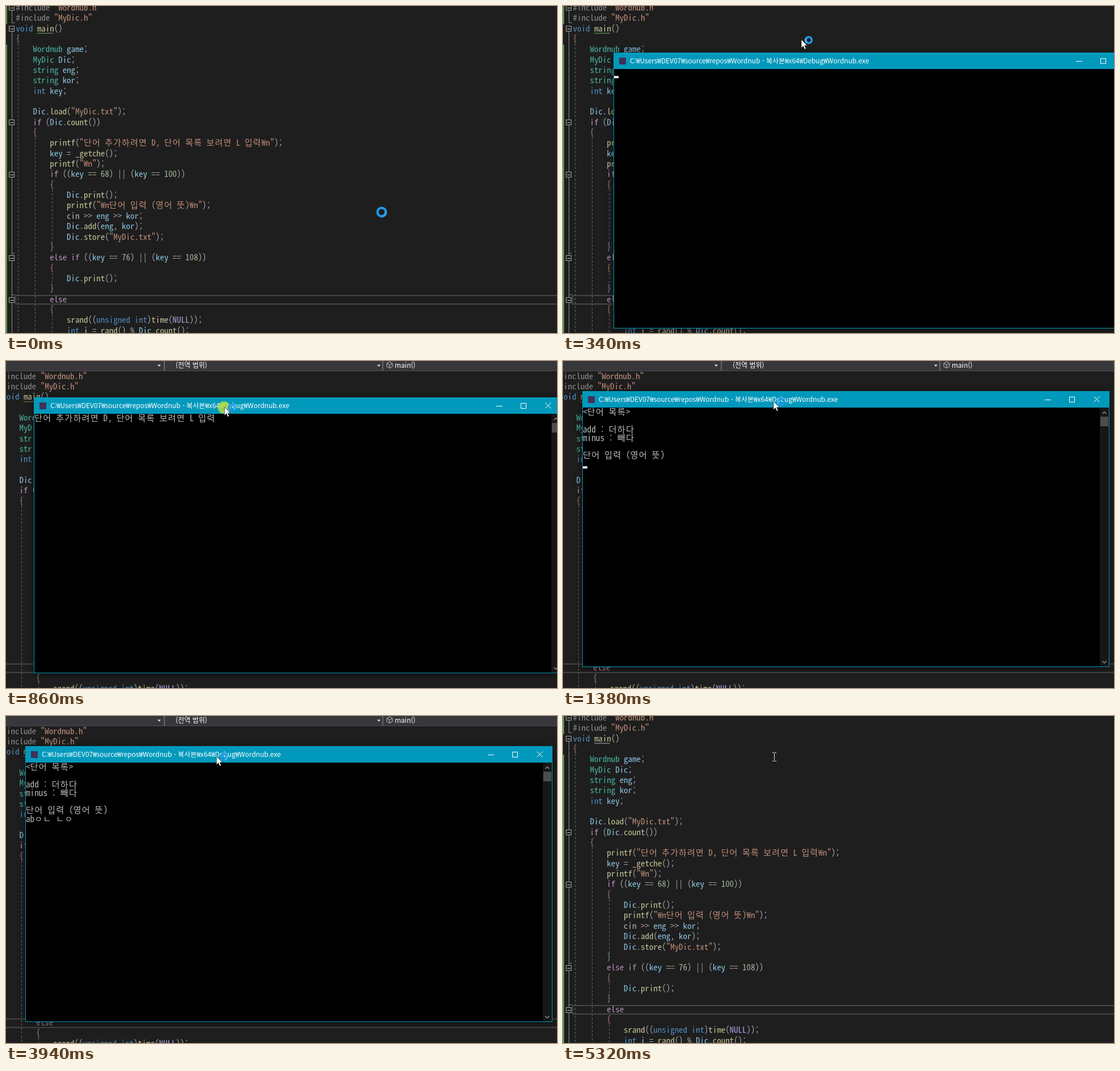
Animation of 971 by 576 pixels, one loop 5520 ms. Source, as an HTML page:

```html
<!DOCTYPE html>
<html lang="ko">
<head>
<meta charset="utf-8">
<style>
  html, body { margin: 0; width: 100%; height: 100%; overflow: hidden; background: #1e1e1e; }
  svg { display: block; }
  .mono { font-family: "Noto Sans Mono CJK KR", "Noto Sans CJK KR", "Noto Sans CJK", "Noto Sans Mono", monospace; font-weight: 300; fill-opacity: .88; }
  .ui { font-family: "Noto Sans CJK KR", "Noto Sans CJK", "Open Sans", sans-serif; }
  #win { filter: drop-shadow(0 3px 7px rgba(0, 0, 0, .5)); }
</style>
</head>
<body>
<svg id="stage" width="971" height="576" viewBox="0 0 971 576"></svg>
<script>
const LOOP = 5520;
const stage = document.getElementById('stage');

function el(tag, attrs, parent = stage) {
  const node = document.createElementNS('http://www.w3.org/2000/svg', tag);
  for (const k in attrs) node.setAttribute(k, attrs[k]);
  return parent.appendChild(node);
}
const rect = (x, y, width, height, fill, parent) => el('rect', { x, y, width, height, fill }, parent);
const line = (d, stroke, parent, more) => el('path', { d, stroke, fill: 'none', ...more }, parent);
const show = (node, on) => node.setAttribute('visibility', on ? 'visible' : 'hidden');
const move = (node, x, y) => node.setAttribute('transform', `translate(${x} ${y})`);

// Hangul takes two cells, everything else one.
const cols = s => [...s].reduce((n, c) => n + (/[\u3131-\ud79d]/.test(c) ? 2 : 1), 0);

function gridText(str, x, y, cell, fill, parent) {
  const xs = [];
  let col = 0;
  for (const c of str) {
    if (c !== ' ') xs.push((x + col * cell).toFixed(2));
    col += cols(c);
  }
  const t = el('text', { x: xs.join(' '), y, fill, class: 'mono', 'font-size': cell * 2 }, parent);
  t.textContent = str.replace(/ /g, '');
}

function label(str, x, y, size, parent) {
  const t = el('text', { x, y, fill: '#fff', class: 'ui', 'font-size': size }, parent);
  t.textContent = str;
  return t;
}

// ---- editor ----
const source = `#include "Wordnub.h"
#include "MyDic.h"
void main()
{
    Wordnub game;
    MyDic Dic;
    string eng;
    string kor;
    int key;

    Dic.load("MyDic.txt");
    if (Dic.count())
    {
        printf("단어 추가하려면 D, 단어 목록 보려면 L 입력₩n");
        key = _getche();
        printf("₩n");
        if ((key == 68) || (key == 100))
        {
            Dic.print();
            printf("₩n단어 입력 (영어 뜻)₩n");
            cin >> eng >> kor;
            Dic.add(eng, kor);
            Dic.store("MyDic.txt");
        }
        else if ((key == 76) || (key == 108))
        {
            Dic.print();
        }
        else
        {
            srand((unsigned int)time(NULL));
            int i = rand() % Dic.count();`.split('\n');

function tokenColor(tok, next) {
  if (tok[0] === '"') return '#d69d85';
  if (tok[0] === '#') return '#9b9b9b';
  if (/^(void|int|unsigned)$/.test(tok)) return '#569cd6';
  if (/^(if|else)$/.test(tok)) return '#cda2d0';
  if (/^(Wordnub|MyDic|string)$/.test(tok)) return '#4ec9b0';
  if (tok === 'NULL') return '#beb7ff';
  if (tok === 'cin') return '#c8c8c8';
  if (/^\d/.test(tok)) return '#b5cea8';
  if (/^\w/.test(tok)) return next === '(' ? '#dcdcaa' : '#9cdcfe';
  if (tok === '{') return '#bf8d78';
  if (tok === '}') return '#7fb0a4';
  return '#b4b4b4';
}

const ide = el('g', {});
const CELL = 7.46, LEFT = 17.6, ROW = 18.35;

el('rect', { x: 17, y: 510, width: 1000, height: 15, fill: 'none', stroke: '#464646', 'stroke-width': 2 }, ide);
rect(0, -30, 2, 62, '#4f9a48', ide);
rect(0, 68, 2, 520, '#4f9a48', ide);
line('M10.5 0V29.5H15.5M10.5 40V576M10.5 435.5H15.5M10.5 508.5H15.5', '#8c8c8c', ide);
for (const y of [3, 40, 205, 297, 444, 518]) {
  el('rect', { x: 5.5, y: y - 4.5, width: 9, height: 9, fill: '#1e1e1e', stroke: '#a5a5a5' }, ide);
  line(`M7.5 ${y + .5}H13`, '#d0d0d0', ide);
}
line('M21.5 66V576M51.5 231V576M81.5 323V418M81.5 470V491M81.5 543V576', '#656565', ide,
  { 'stroke-dasharray': '4 3' });

source.forEach((text, row) => {
  for (const m of text.matchAll(/"[^"]*"|#\w+|\w+|\S/g)) {
    const x = LEFT + cols(text.slice(0, m.index)) * CELL;
    gridText(m[0], x, 7.8 + row * ROW, CELL, tokenColor(m[0], text[m.index + m[0].length]), ide);
  }
});

let wave = 'M55 47';
for (let i = 0; i < 7; i++) wave += 'l2 2l2 -2';
const squiggle = line(wave, '#6fb35c', ide);

const bar = el('g', {});
rect(0, 0, 971, 18, '#38383c', bar);
rect(0, 17, 971, 1, '#4a4a4e', bar);
for (const x of [278, 663]) rect(x, 0, 2, 17, '#66666a', bar);
for (const x of [267, 654]) el('path', { d: `M${x} 6.5h6l-3 3.5z`, fill: '#e0e0e0' }, bar);
line('M676 1.5L681 4.2V9.8L676 12.5L671 9.8V4.2ZM671 4.2L676 7L681 4.2M676 7V12.5', '#c0b8cc', bar);
label('(전역 범위)', 299, 11.5, 12, bar);
label('main()', 685, 11.5, 12, bar);

// ---- console window ----
const TEAL = '#0099bc', CW = 7.6;
const win = el('g', { id: 'win' });
rect(0, 0, 929, 486, TEAL, win);
rect(1, 29, 927, 456, '#000', win);
rect(10, 9, 12, 12, '#41305a', win);
const title = label('', 29, 18.8, 11.9, win);
line('M815 15.5H826M858.5 10.5H867.5V19.5H858.5ZM901.5 9.5L911.5 19.5M911.5 9.5L901.5 19.5', '#fff', win);
rect(912, 29, 16, 456, '#171717', win);
rect(913, 45, 14, 17, '#4d4d4d', win);
line('M916.5 40L920 36.5L923.5 40M916.5 475.5L920 479L923.5 475.5', '#8c8c8c', win, { 'stroke-width': 1.5 });
const screen = el('g', {}, win);
const caret = rect(0, 0, 8, 4, '#f0f0f0', win);

const path = 'C:|Users|DEV07|source|repos|Wordnub - 복사본|x64|Debug|Wordnub.exe';
const runTitle = path.replace(/\|/g, '₩');
const endTitle = 'Larkfield Indigo Office 디버그 콘솔';
const prompt = ['단어 추가하려면 D, 단어 목록 보려면 L 입력', ''];
const list = ['<단어 목록>', '', 'add : 더하다', 'minus : 빼다', '', '단어 입력 (영어 뜻)'];
const result = ['영어 아님', '',
  path.replace(/\|/g, '\\') + '(프로세스 20636개)이(가) 종료되었습니다(코드: 0개).',
  '디버깅이 중지될 때 콘솔을 자동으로 닫으려면 [도구] -> [옵션] -> [디버깅] > [디버깅이 중지되면 자동으로 콘솔 닫기]를 사용',
  '하도록 설정합니다.',
  '이 창을 닫으려면 아무 키나 누르세요...'];
const typed = 'abㅇㄴ ㄴㅇㄹ';
const keyTimes = [1970, 2240, 2570, 3150, 3420, 3680, 3880, 4070];
const LIST_AT = 1250, RESULT_AT = 4400;

function consoleLines(t) {
  if (t < 530) return [''];
  if (t < LIST_AT) return prompt;
  const input = typed.slice(0, keyTimes.filter(k => k <= t).length);
  return [...list, input, ...(t >= RESULT_AT ? result : [])];
}

let shown = null;
function drawConsole(t) {
  const lines = consoleLines(t), key = lines.join('\n');
  const last = lines.length - 1;
  if (key !== shown) {
    shown = key;
    screen.replaceChildren();
    lines.forEach((s, r) => s && gridText(s, 1, 42.3 + r * 15.2, CW, '#d4d4d4', screen));
    caret.setAttribute('x', 1 + cols(lines[last]) * CW);
    caret.setAttribute('y', 41.2 + last * 15.2);
  }
  title.textContent = t < 4460 ? runTitle : endTitle;
  const blink = (t + 860) % 1060 < 530;
  const visible = t >= 270 && t < 5320;
  show(caret, visible && (t >= RESULT_AT || (t < keyTimes[0] && blink)));
}

// ---- pointer ----
const press = el('circle', { r: 11, fill: '#b9dc3c', 'fill-opacity': .8 });
function makeRing(r, w, glow) {
  const g = el('g', {});
  el('circle', { r, fill: 'none', stroke: '#1d97e6', 'stroke-width': w }, g);
  const arc = el('circle', { r, fill: 'none', stroke: glow, 'stroke-width': w,
    'stroke-dasharray': `${r * 1.6} ${r * 4.7}` }, g);
  return { g, arc };
}
const bigRing = makeRing(7.4, 4.2, '#2a9fe9'), smallRing = makeRing(5.4, 3.6, '#3fb2f0');
const arrow = el('path', { d: 'M0 0V14.8L3.4 11.6L5.8 17.2L8.2 16.2L5.8 10.7H10.4Z',
  fill: '#fff', stroke: '#222', 'stroke-width': .7 });
const beam = line('M369 64.5H371.5L372.5 65.5L373.5 64.5H376M372.5 65V79M369 79.5H371.5L372.5 78.5L373.5 79.5H376', '#e4e4e4');

function track(keys, t) {
  const i = keys.findIndex(k => k[0] > t);
  if (i === 0) return keys[0].slice(1);
  if (i < 0) return keys[keys.length - 1].slice(1);
  const [a, b] = [keys[i - 1], keys[i]];
  const p = (t - a[0]) / (b[0] - a[0]);
  return [1, 2].map(n => a[n] + (b[n] - a[n]) * p);
}
const pointerKeys = [[60, 662, 363], [310, 420, 59], [350, 420, 59], [520, 424, 98], [720, 396, 89], [1050, 371, 71]];
const windowKeys = [[520, 89, 82], [720, 61, 73], [1050, 34, 53]];

function render(t) {
  const debugging = t >= 470 && t < 4600;
  move(ide, debugging ? -24 : 0, debugging ? 23.7 : 0);
  show(bar, debugging);
  squiggle.setAttribute('stroke', t < 5320 ? '#6fb35c' : '#b4b4b4');

  const open = t >= 270 && t < 5320;
  show(win, open);
  move(win, ...track(windowKeys, t).map(Math.round));
  drawConsole(t);

  const [x, y] = track(pointerKeys, t).map(Math.round);
  show(bigRing.g, t < 270);
  show(smallRing.g, open && t < 4660);
  show(arrow, open);
  show(beam, t >= 5320);
  show(press, t >= 520 && t < 1080);
  move(bigRing.g, x, y);
  move(smallRing.g, x + 13, y + 1);
  move(arrow, x, y);
  move(press, x - 1, y + 1);
  for (const ring of [bigRing, smallRing]) ring.arc.setAttribute('transform', `rotate(${t * .36 % 360})`);
}

const start = performance.now();
function tick() {
  render((performance.now() - start) % LOOP);
  requestAnimationFrame(tick);
}
tick();
</script>
</body>
</html>
```
